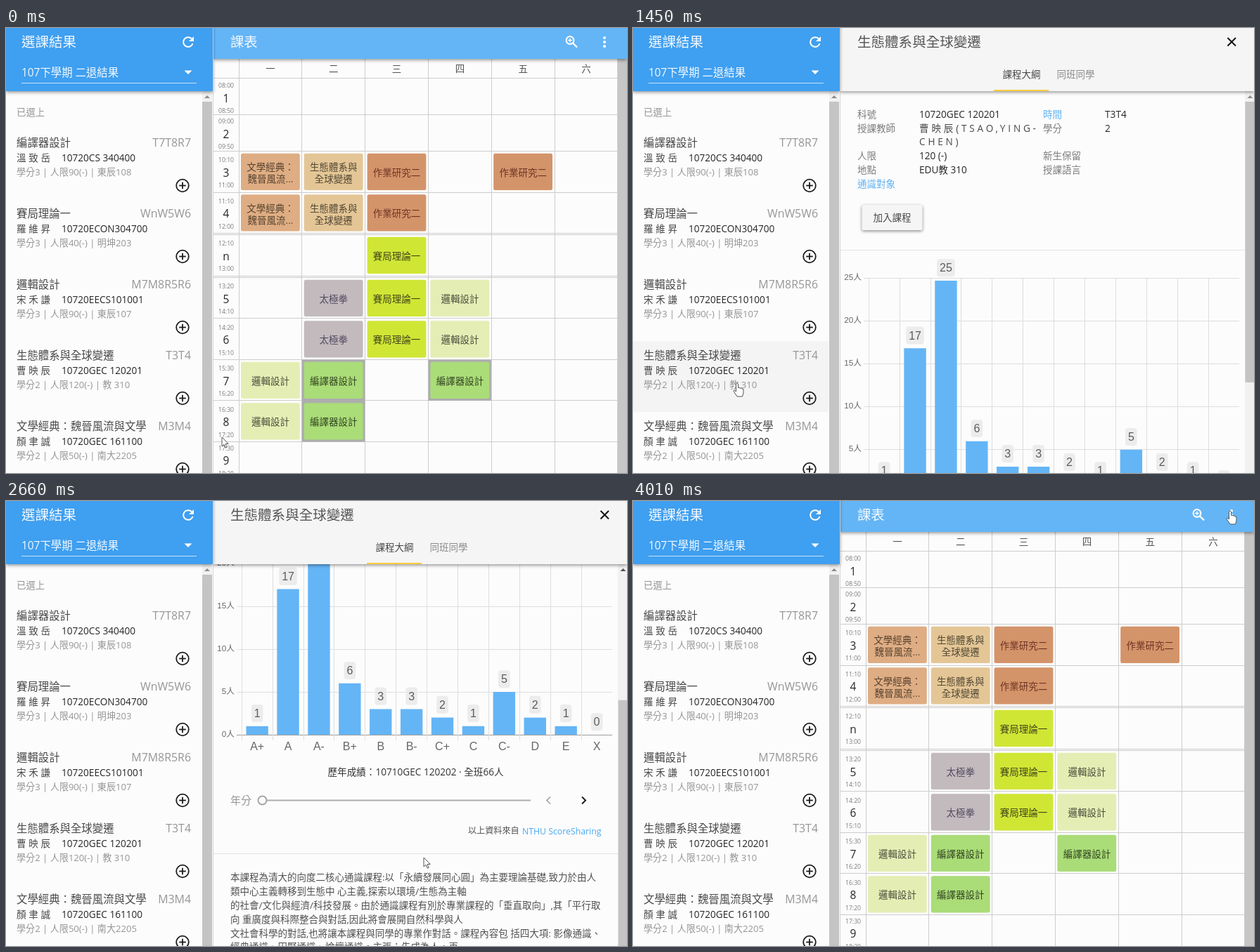
Write an HTML page with a canvas that moves like this. It is 883x634 px and loops after 4190 ms.

```html
<!DOCTYPE html>
<html lang="zh-Hant">
<head>
<meta charset="utf-8">
<title>選課結果</title>
<style>
html, body { margin: 0; width: 100%; height: 100%; overflow: hidden; background: #fcfcfc; }
canvas { display: block; }
</style>
</head>
<body>
<canvas id="stage" width="883" height="634"></canvas>
<script>
const W = 883, H = 634, LOOP = 4190;
const ctx = document.getElementById('stage').getContext('2d');
const SANS = '"Open Sans", "Noto Sans CJK TC", "Noto Sans CJK", sans-serif';
const ARIAL = '"Liberation Sans", "Noto Sans CJK TC", "Noto Sans CJK", sans-serif';
const BLUE = '#64b5f6', LINK = '#5fb2f3', PAPER = '#fcfcfc', LINE = '#dedede';
const DARK = '#262626', INK = '#484848', SOFT = '#7c7c7c', GREY = '#969696';

const TICKS = [0, 70, 120, 190, 250, 310, 370, 680, 820, 870, 940, 1010, 1060, 1130, 1200, 1260, 1330,
  1380, 1450, 1520, 1580, 1640, 1700, 1770, 1830, 1890, 1960, 2030, 2100, 2150, 2220, 2280, 2350, 2410,
  2470, 2540, 2610, 2660, 2730, 2790, 2850, 2910, 2980, 3050, 3120, 3180, 3250, 3310, 3370, 3440, 3500,
  3570, 3640, 3690, 3760, 3820, 3880, 4010];
const CLICK = 680, OPEN = 820, CLOSE = 3690;

// [time, x, y] and [time, offset]
const POINTER = [[0, 307, 583], [370, 97, 485], [1330, 97, 485], [1450, 148, 506], [1890, 515, 530],
  [2100, 537, 513], [2470, 540, 513], [2910, 665, 502], [3050, 723, 432], [3500, 849, 56],
  [3640, 849, 20], [4010, 849, 14]];
const SCROLL = [[1890, 0], [2100, 127], [2910, 418], [3050, 483]];

const ITEMS = [
  ['編譯器設計', 'T7T8R7', '溫致岳', '10720CS 340400', '學分3 | 人限90(-) | 東辰108'],
  ['賽局理論一', 'WnW5W6', '羅維昇', '10720ECON304700', '學分3 | 人限40(-) | 明坤203'],
  ['邏輯設計', 'M7M8R5R6', '宋禾謙', '10720EECS101001', '學分3 | 人限90(-) | 東辰107'],
  ['生態體系與全球變遷', 'T3T4', '曹映辰', '10720GEC 120201', '學分2 | 人限120(-) | 教 310'],
  ['文學經典：魏晉風流與文學', 'M3M4', '顏聿誠', '10720GEC 161100', '學分2 | 人限50(-) | 南大2205']
];

const ROWS = [
  ['1', '08:00', '08:50', 100], ['2', '09:00', '09:50', 151], ['3', '10:10', '11:00', 206],
  ['4', '11:10', '12:00', 264.5], ['n', '12:10', '13:00', 325], ['5', '13:20', '14:10', 386],
  ['6', '14:20', '15:10', 444.5], ['7', '15:30', '16:20', 503], ['8', '16:30', '17:20', 561.5],
  ['9', '17:30', '18:20', 616.5]
];
const RULES = [71, 123, 175, 234, 292, 294, 353, 355, 413, 472, 530, 589];

// list index, fill, text colour, lines, [column, row] places
const COURSES = [
  [4, '#dfad83', '#54402e', ['文學經典：', '魏晉風流...'], [[0, 2], [0, 3]]],
  [3, '#e4c696', '#524835', ['生態體系與', '全球變遷'], [[1, 2], [1, 3]]],
  [-1, '#d4946a', '#6e3425', ['作業研究二'], [[2, 2], [2, 3], [4, 2]]],
  [1, '#d0e635', '#40451b', ['賽局理論一'], [[2, 4], [2, 5], [2, 6]]],
  [-1, '#c2babd', '#504a60', ['太極拳'], [[1, 5], [1, 6]]],
  [2, '#e4eeb4', '#4a4d3c', ['邏輯設計'], [[3, 5], [3, 6], [0, 7], [0, 8]]],
  [0, '#aadc78', '#324320', ['編譯器設計'], [[1, 7], [1, 8], [3, 7]]]
];

const GRADES = ['A+', 'A', 'A-', 'B+', 'B', 'B-', 'C+', 'C', 'C-', 'D', 'E', 'X'];
const COUNTS = [1, 17, 25, 6, 3, 3, 2, 1, 5, 2, 1, 0];

const OUTLINE = [
  '本課程為清大的向度二核心通識課程:以「永續發展同心圓」為主要理論基礎,致力於由人',
  '類中心主義轉移到生態中 心主義,探索以環境/生態為主軸',
  '的社會/文化與經濟/科技發展。由於通識課程有別於專業課程的「垂直取向」,其「平行取',
  '向 重廣度與科際整合與對話,因此將會展開自然科學與人',
  '文社會科學的對話,也將讓本課程與同學的專業作對話。課程內容包 括四大項: 影像通識、',
  '經典通識、田野通識、論壇通識。主張：先成為人，再',
  '成為公民（關心地球），後成為士農工商。發展永續發展論述力（同時考量環境、社會與',
  '經濟）、抓地力（在地社區及校園的環境行動力）、守',
  '望力'
];

function track(keys, t) {
  if (t <= keys[0][0]) return keys[0].slice(1);
  for (let i = 1; i < keys.length; i++) {
    const a = keys[i - 1], b = keys[i];
    if (t <= b[0]) {
      const k = (t - a[0]) / (b[0] - a[0]);
      return a.slice(1).map((v, j) => v + (b[j + 1] - v) * k);
    }
  }
  return keys[keys.length - 1].slice(1);
}

// y is the optical middle of the line
function text(str, x, y, size, color = INK, { align = 'left', font = SANS, gap = 0 } = {}) {
  ctx.font = `${size}px ${font}`;
  ctx.letterSpacing = gap + 'px';
  ctx.textAlign = align;
  ctx.fillStyle = color;
  ctx.fillText(str, x, y + size * 0.37);
}

function box(x, y, w, h, color, r = 0, blur = 0) {
  ctx.save();
  if (blur) {
    ctx.shadowColor = 'rgba(0,0,0,.45)';
    ctx.shadowBlur = blur;
    ctx.shadowOffsetY = 1.5;
  }
  ctx.fillStyle = color;
  ctx.beginPath();
  ctx.roundRect(x, y, w, h, r);
  ctx.fill();
  ctx.restore();
}

function stroke(points, color, width = 2) {
  ctx.strokeStyle = color;
  ctx.lineWidth = width;
  ctx.beginPath();
  points.forEach(([x, y], i) => i ? ctx.lineTo(x, y) : ctx.moveTo(x, y));
  ctx.stroke();
}

function plus(x, y, arm, color, width) {
  stroke([[x - arm, y], [x + arm, y]], color, width);
  stroke([[x, y - arm], [x, y + arm]], color, width);
}

function circle(x, y, r, fill, line, width = 2) {
  ctx.beginPath();
  ctx.arc(x, y, r, 0, Math.PI * 2);
  if (fill) { ctx.fillStyle = fill; ctx.fill(); }
  if (line) { ctx.strokeStyle = line; ctx.lineWidth = width; ctx.stroke(); }
}

function triangle(x, y, half, h, color) {
  ctx.fillStyle = color;
  ctx.beginPath();
  ctx.moveTo(x - half, y);
  ctx.lineTo(x + half, y);
  ctx.lineTo(x, y + h);
  ctx.fill();
}

function sidebar(hover) {
  box(0, 0, 295, H, PAPER);
  if (hover >= 0) box(0, 143 + 101 * hover, 278, 101, '#f4f4f4');
  text('已選上', 15, 120, 13.4, GREY);
  ITEMS.forEach(([name, slot, teacher, code, info], i) => {
    const y = 163 + 101 * i;
    text(name, 15, y, 15.4);
    text(slot, 263, y, 15.9, GREY, { align: 'right' });
    text(teacher, 15, y + 22, 13.6, INK, { gap: 3.6 });
    text(code, 79, y + 22, 13.6, DARK);
    text(info, 15, y + 42, 13.1, GREY);
    circle(251, y + 61.5, 8.8, null, '#1c1c1c', 1.8);
    plus(251, y + 61.5, 4.8, '#1c1c1c', 1.8);
  });
  box(279, 90, 14, H - 90, '#f1f1f1');
  box(279, 105, 14, H - 105, '#c4c4c4');
  triangle(286, 100, 4, -4, '#8c8c8c');
  box(294, 90, 1, H - 90, '#d4d4d4');
  box(0, -10, 294, 100, '#3f9ff0', 0, 5);
  text('選課結果', 22, 20, 19.5, '#f4f9fe');
  text('107下學期 二退結果', 22, 63, 15.4, '#f4f9fe');
  box(22, 78, 249, 1, 'rgba(255,255,255,.7)');
  triangle(259, 60.5, 5.5, 5.5, '#fff');
  ctx.strokeStyle = '#fff';
  ctx.lineWidth = 2;
  ctx.beginPath();
  ctx.arc(259, 20, 6.8, 0.3, 5.5);
  ctx.stroke();
  ctx.fillStyle = '#fff';
  ctx.beginPath();
  ctx.moveTo(267, 12);
  ctx.lineTo(267, 19);
  ctx.lineTo(260, 19);
  ctx.fill();
}

function timetable(hover) {
  const colX = i => 331 + 89.8 * i;
  const mid = { align: 'center' };
  box(295, 0, 588, H, PAPER);
  RULES.forEach(y => box(295, y, 575, 1, '#cdcdcd'));
  for (let i = 0; i < 7; i++) box(Math.floor(colX(i)), 44, 1, H - 44, '#cdcdcd');
  [...'一二三四五六'].forEach((d, i) => text(d, colX(i) + 45, 58, 13.5, '#555', mid));
  ROWS.forEach(([name, from, to, y]) => {
    text(from, 313, y - 18, 8.7, SOFT, mid);
    text(name, 313, y, 15.5, DARK, mid);
    text(to, 313, y + 18, 8.7, SOFT, mid);
  });
  COURSES.forEach(([item, fill, ink, lines, places]) => places.forEach(([c, r]) => {
    const x = colX(c) + 3, y = ROWS[r][3];
    if (item >= 0 && item === hover) box(x - 3, y - 30.5, 89.5, 58.5, '#adadad');
    box(x, y - 27.2, 83.8, 52.2, fill, 2.5);
    lines.forEach((s, i) => text(s, x + 42, y + (i - (lines.length - 1) / 2) * 17 + (lines.length > 1 ? 0.8 : 0), 13.5, ink, mid));
  }));
  box(870, 44, 13, H - 44, '#c6c6c6');
  box(295, -10, 588, 54, BLUE, 0, 5);
  text('課表', 319, 20, 19.3, '#f6fafe');
  circle(802, 17.5, 5.4, null, '#fff');
  stroke([[806, 21.5], [812, 27.5]], '#fff', 2.4);
  plus(802, 17.5, 3, '#fff', 1.4);
  [14, 20, 26].forEach(y => circle(851, y, 2, '#fff'));
}

function chart(grow) {
  const left = 335.2, step = 43.9, zero = 661, unit = 12.2;
  const opts = { align: 'center', font: ARIAL };
  const barX = i => left + step * (i + 0.5);
  for (let n = 0; n <= 25; n += 5) {
    const y = zero - n * unit;
    box(328, y, 534, 1, n ? LINE : '#9f9f9f');
    text(n + '人', 325, y - 1, 11.7, '#666', { align: 'right', font: ARIAL });
  }
  GRADES.forEach((g, i) => {
    box(Math.floor(left + step * i), 356, 1, zero - 348, LINE);
    text(g, barX(i), 677, 16, '#666', opts);
  });
  COUNTS.forEach((n, i) => {
    const h = n * unit * grow;
    box(barX(i) - 15.7, zero - h, 31.4, h, BLUE);
  });
  COUNTS.forEach((n, i) => {
    const x = barX(i), y = zero - n * unit * grow - 18.3;
    const w = n > 9 ? 25.5 : 16.5;
    box(x - w / 2, y - 12.5, w, 25, 'rgba(234,234,234,.92)', 4);
    text(String(n), x, y - 0.3, 16, '#5c5c5c', opts);
  });
}

function button(label, x, y, w) {
  box(x, y, w, 36, '#f5f5f5', 2, 4);
  text(label, x + w / 2, y + 18, 13.5, INK, { align: 'center' });
}

function details(scroll, grow) {
  box(295, 0, 588, H, PAPER);
  ctx.save();
  ctx.beginPath();
  ctx.rect(295, 90, 575, H - 90);
  ctx.clip();
  ctx.translate(0, -Math.round(scroll));

  text('科號', 319, 123, 13.5, SOFT);
  text('授課教師', 319, 143, 13.5, SOFT);
  text('人限', 319, 182, 13.5, SOFT);
  text('地點', 319, 202, 13.5, SOFT);
  text('通識對象', 319, 222, 13.5, LINK);
  text('時間', 583, 123, 13.5, LINK);
  text('學分', 583, 143, 13.5, SOFT);
  text('新生保留', 583, 182, 13.5, SOFT);
  text('授課語言', 583, 202, 13.5, SOFT);
  text('10720GEC 120201', 407, 123, 13.6, DARK);
  text('曹映辰(TSAO,YING-', 407, 143, 13.6, INK, { gap: 3.8 });
  text('CHEN)', 407, 162, 13.6, INK, { gap: 3.8 });
  text('120 (-)', 407, 182, 13.6, DARK);
  text('EDU教 310', 407, 202, 13.6, DARK);
  text('T3T4', 671, 123, 13.7, DARK);
  text('2', 671, 143, 13.7, DARK);
  button('加入課程', 325.5, 252, 86);
  box(295, 316, 575, 1, '#e2e2e2');

  chart(grow);
  text('歷年成績：10710GEC 120202 · 全班66人', 582.5, 714, 13.6, '#333', { align: 'center' });
  text('年分', 319, 754.5, 15, GREY);
  box(371, 753.5, 375, 2, '#adadad');
  circle(364.5, 754.5, 6, PAPER, '#a6a6a6');
  stroke([[774, 749.5], [769, 754.5], [774, 759.5]], '#a0a0a0', 1.7);
  stroke([[819, 749.5], [824, 754.5], [819, 759.5]], '#1c1c1c', 2);
  text('以上資料來自', 657, 798, 12.1, '#505050');
  text('NTHU ScoreSharing', 846.5, 798, 12.3, '#4aa9f0', { align: 'right' });
  box(295, 830, 575, 1, '#e2e2e2');

  OUTLINE.forEach((s, i) => text(s, 319, 864.5 + 19.8 * i, 13.5, '#505050'));
  box(295, 1055, 575, 1, '#e2e2e2');
  button('下載課程大綱', 325.5, 1085, 113);
  ctx.restore();

  box(870, 90, 13, H - 90, '#f1f1f1');
  box(870.5, 105 + scroll * 0.5445, 12.5, 400, '#c4c4c4');
  triangle(877.5, 100, 4, -4, scroll > 0 ? '#505050' : '#8c8c8c');

  box(295, -10, 588, 100, '#f5f5f5', 0, 5);
  text('生態體系與全球變遷', 319, 20, 19.55, '#555');
  text('課程大綱', 552.5, 66.5, 13.5, INK, { align: 'center' });
  text('同班同學', 629.5, 66.5, 13.5, '#8a8a8a', { align: 'center' });
  box(513, 88, 78, 2, '#fbcb3c');
  stroke([[845.5, 14], [857, 25.5]], '#111', 2);
  stroke([[857, 14], [845.5, 25.5]], '#111', 2);
}

const ARROW = new Path2D('M0 0V13L3 10.3 5.2 15.2 7.2 14.3 5 9.6 9.2 9.4Z');
const HAND = new Path2D('M-1.5 1Q0-1 1.5 1V6.5L3 6 4 7.2 6 6.8 7 8 9 8.6V14L7.5 19H0L-4 13Q-6 10.5-4 9.8L-1.5 12Z');

function pointer(x, y, hand) {
  const shape = hand ? HAND : ARROW;
  ctx.save();
  ctx.translate(Math.round(x), Math.round(y));
  ctx.fillStyle = '#fff';
  ctx.fill(shape);
  ctx.strokeStyle = '#555';
  ctx.lineWidth = 1;
  ctx.stroke(shape);
  ctx.restore();
}

function draw(t) {
  const open = t >= OPEN && t < CLOSE;
  const [x, y] = track(POINTER, t);
  const inList = x < 278;
  const hover = inList ? Math.floor((y - 143) / 101) : -1;
  if (open) {
    const k = Math.min(1, Math.max(0, (t - 855) / 900));
    details(track(SCROLL, t)[0], 1 - (1 - k) ** 4);
  } else {
    timetable(t < 70 ? 0 : hover);
  }
  sidebar(hover);
  if (t >= CLICK && t < OPEN) circle(97.5, 485.5, 24, 'rgba(0,0,0,.12)');
  pointer(x, y, inList || y < 35);
}

function loop(now) {
  const t = now % LOOP;
  draw(TICKS.findLast(v => v <= t));
  requestAnimationFrame(loop);
}
draw(0);
requestAnimationFrame(loop);
</script>
</body>
</html>
```
